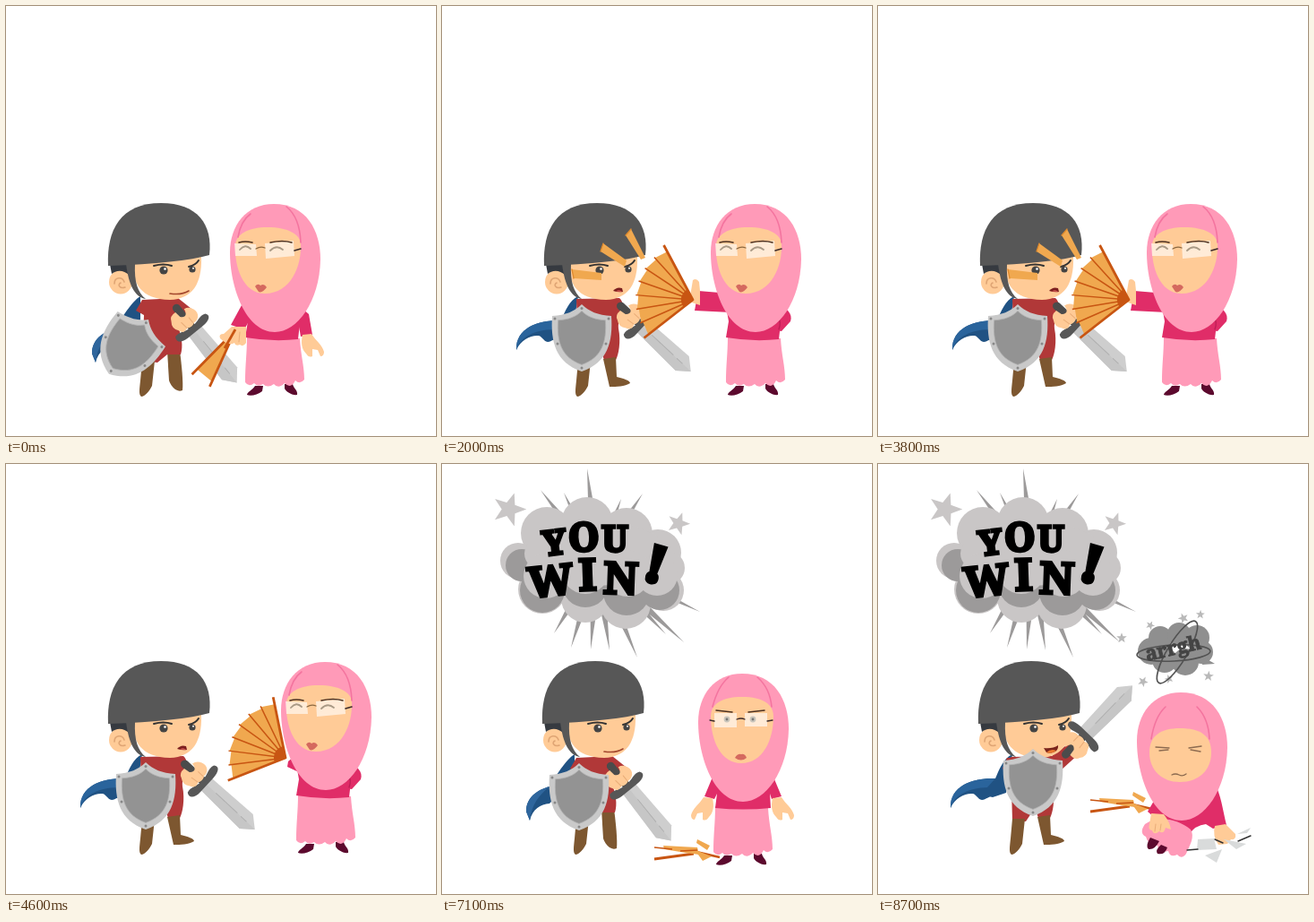
Recreate the animation shown at these times as an HTML page. Size 480 by 480 pixels, loop 8.9 s.

```html
<!DOCTYPE html>
<html lang="en">
<head>
<meta charset="utf-8">
<title>Duel</title>
<style>
html, body { margin: 0; width: 100%; height: 100%; overflow: hidden; background: #fff; }
svg { display: block; width: 100%; height: 100%; }
.skin { fill: #ffcb97; }
.grey { fill: #575757; }
.pink { fill: #ff9ab8; }
.rose { fill: #e02d68; }
.boot { fill: #7d5730; }
.red { fill: #b13838; }
.shoe { fill: #5c0a2e; }
.gold { fill: #f0a84f; }
.line { fill: none; stroke-linecap: round; stroke-linejoin: round; }
.fold { stroke: #f4749f; stroke-width: 1.6; }
.brow { stroke: #4a3020; stroke-width: 1.5; }
.eye { stroke: #a99a86; stroke-width: 1.8; }
.stick { stroke: #c85512; stroke-width: 2.8; stroke-linecap: butt; }
.finger { stroke: #e9ac78; stroke-width: 1; }
text { font-family: "Noto Serif", "Liberation Serif", serif; font-weight: 900; text-anchor: middle; }
#title text { fill: #000; stroke: #000; stroke-width: 3.4; }
</style>
</head>
<body>
<svg viewBox="0 0 480 480">
<defs>
  <path id="star" d="M0-10 2.6-3.2 10-3 4.2 1.6 6.2 9 0 4.6-6.2 9-4.2 1.6-10-3-2.6-3.2Z"/>
  <path id="plate" d="M156 333C148 341 138 345 123 346C121 375 127 398 156 408C185 398 191 375 189 346C174 345 164 341 156 333Z"/>
  <path id="hand" class="skin" d="M331 367L341 366C346 374 353 378 355 386Q355 391 351 391L348 384L342 383L342 391Q338 393 335 388C330 383 329 376 331 367Z"/>
  <path id="veil" d="M299 221C335 221 351 250 351 283C350 330 325 364 300 364C268 364 250 315 250 275C250 245 268 221 299 221Z"/>
  <path id="skirt" d="M269 369L328 371C329 390 333 402 333 417Q328 423 323 418Q318 428 311 421Q304 428 299 422Q292 427 287 422Q281 426 277 421Q271 426 267 420C267 400 269 388 269 369Z"/>
  <g id="shoes" class="shoe">
    <path d="M278 424L287 424L286 430C281 434 273 436 269 434C269 431 275 429 278 424Z"/>
    <path d="M311 422L320 422C321 427 326 429 325 434C319 435 312 430 311 427Z"/>
  </g>
</defs>

<g id="title">
  <path id="spikes" fill="#9c9a9a"/>
  <g fill="#c9c6c6">
    <use href="#star" transform="translate(75 50) rotate(18) scale(1.85)"/>
    <use href="#star" transform="translate(264 66) rotate(20) scale(1.25)"/>
    <circle cx="85" cy="108" r="20"/><circle cx="117" cy="77" r="29"/>
    <circle cx="162" cy="66" r="29"/><circle cx="206" cy="78" r="29"/>
    <circle cx="241" cy="99" r="26"/><circle cx="253" cy="116" r="18"/>
    <circle cx="112" cy="140" r="27"/><circle cx="160" cy="150" r="27"/>
    <circle cx="205" cy="156" r="28"/><circle cx="247" cy="141" r="23"/>
  </g>
  <g fill="#9c9a9a">
    <circle cx="89" cy="113" r="18"/><circle cx="112" cy="141" r="25"/>
    <circle cx="160" cy="134" r="26"/><circle cx="206" cy="143" r="26"/>
    <circle cx="243" cy="141" r="22"/>
  </g>
  <g fill="#c9c6c6">
    <ellipse cx="172" cy="100" rx="80" ry="36"/>
    <circle cx="116" cy="125" r="25"/><circle cx="160" cy="118" r="27"/>
    <circle cx="207" cy="122" r="26"/><circle cx="240" cy="124" r="23"/>
  </g>
  <text font-size="38" transform="translate(127 101) rotate(-7)">Y</text>
  <text font-size="44" transform="translate(159 97) rotate(-3)">O</text>
  <text font-size="39" transform="translate(193 98)">U</text>
  <text font-size="47" transform="translate(123 147) rotate(-6)">W</text>
  <text font-size="49" transform="translate(163 141) rotate(-2)">I</text>
  <text font-size="49" transform="translate(199 145) rotate(2)">N</text>
  <text font-size="55" style="stroke-width:6" transform="translate(233 131) rotate(16)">!</text>
</g>

<g id="knight">
  <g data-on="ready proud">
    <path fill="#205283" d="M150 324C140 330 128 350 122 360C108 364 96 372 96 388L100 398C103 385 112 380 122 379L150 350Z"/>
    <path fill="#2f669d" d="M122 360C108 364 96 372 96 388L100 398C102 380 110 370 122 360Z"/>
    <path class="boot" d="M180 385L194 385C196 400 198 420 197 429C190 432 184 424 182 418Z"/>
    <path class="red" d="M152 328L192 326L212 342L192 358C196 368 198 380 195 389L180 389L169 398L152 396L154 345L145 340Z"/>
  </g>
  <g data-on="guard thrust raise cheer">
    <path fill="#205283" d="M152 324C142 328 137 342 133 351C110 350 82 358 83 384C88 372 100 367 108 368C112 369 113 374 118 375C124 374 126 370 130 372L145 367Z"/>
    <path fill="#2a649c" d="M133 351C110 350 82 358 83 384C88 368 104 362 124 361Z"/>
    <path class="red" d="M150 327L198 326C207 334 196 345 197 360C200 375 197 390 194 395L181 395L177 384L167 399L152 398Z"/>
    <path class="boot" d="M180 394L194 392L195 414C203 416 210 418 210 421C204 425 195 425 187 425Z"/>
  </g>
  <path data-on="cheer" class="red" d="M146 328L196 326L219 309L228 322L206 342L170 360L141 340Z"/>
  <path class="boot" d="M152 396L166 396L163 424C160 430 155 436 151 436C148 434 149 428 150 418Z"/>

  <ellipse class="skin" cx="128" cy="308" rx="13" ry="13.5"/>
  <path class="line" stroke="#dfa574" stroke-width="1.6" d="M121 310C121 302 130 302 132 308M133 314C127 316 124 311 128 309"/>
  <path class="skin" d="M141 287C142 310 150 327 183 328C208 327 219 310 218 280Z"/>
  <path fill="#363a40" d="M116 288L137 288L138 301C130 293 122 296 118 299Z"/>
  <path class="grey" d="M134 288L144 288C143 308 147 320 156 327C144 325 137 312 134 288Z"/>
  <path class="grey" d="M114 290C112 250 128 220 173 220C214 220 231 244 227 278Q195 287 114 290Z"/>
  <g fill="#444"><circle cx="176" cy="295" r="4.6"/><circle cx="208" cy="294" r="3.6"/></g>
  <g fill="#fff"><circle cx="177.5" cy="293.5" r="1.3"/><circle cx="209" cy="292.7" r="1"/></g>
  <path class="line" stroke="#333" stroke-width="2" d="M165 290Q176 287 185 290M204 291Q212 289 215 284"/>
  <path data-on="ready proud" class="line" stroke="#a2462c" stroke-width="1.6" d="M183 321Q196 323 204 318"/>
  <g data-on="guard">
    <path fill="#7c1f1f" d="M191 318Q195 313 201 315L202 319Q197 320 191 318Z"/>
    <path fill="#d65a55" d="M194 318.5Q198 316 201 319Z"/>
  </g>
  <g data-on="thrust raise">
    <path fill="#5e1c1c" d="M188 321C191 313 200 312 205 315C206 320 202 322 188 321Z"/>
    <path fill="#d65a55" d="M191 321Q196 315 201 320Z"/>
  </g>
  <g data-on="cheer">
    <path fill="#7a241c" d="M187 317Q197 318 203 314C204 321 196 324 190 322Z"/>
    <path fill="#e8772f" d="M190 322Q195 317 201 320Q196 324 190 322Z"/>
  </g>
  <g id="hits" class="gold">
    <path d="M180 265L206 284L204 291L177 274Z"/>
    <path d="M211 249L227 281L222 283L205 256Z"/>
    <path d="M145 294L178 298L178 306L147 304Z"/>
    <path class="line" stroke="#e08a2c" stroke-width="1.3" d="M180 265L177 274M211 249L205 256M145 294L147 304"/>
  </g>
  <g id="sword">
    <path fill="#cecece" d="M4-9L66-11L79 0L66 11L4 9Z"/>
    <path fill="#c6c6c6" d="M4 0L70 0L79 0L66 11L4 9Z"/>
    <path class="line" stroke="#b0b0b0" d="M20 0H52M58 0H66"/>
    <path class="line" stroke="#4b4b4b" stroke-width="9" d="M-28 0L0 0"/>
    <path class="grey" d="M-3-21C2-25 6-20 6-10L6 11C6 21 1 25-4 21C-6 14-1 10-1 0C-1-10-6-14-3-21Z"/>
    <path class="skin" d="M-15-14C-7-17-2-10-3-5Q0 0-3 5Q0 12-7 14Q-14 19-20 14Q-26 12-25 4L-18 3C-13-1-15-5-22-6Q-21-12-15-14Z"/>
    <path class="line finger" d="M-4-4L-11-4M-4 5L-12 6"/>
  </g>
  <g id="shield">
    <use href="#plate" fill="#c9c9c9"/>
    <use href="#plate" fill="#939393" stroke="#b2b2b2" transform="translate(156 370) scale(.8) translate(-156 -370)"/>
    <g fill="#888"><circle cx="156" cy="337.5" r="1.5"/><circle cx="126" cy="349" r="1.5"/><circle cx="186" cy="349" r="1.5"/><circle cx="129" cy="377" r="1.5"/><circle cx="183" cy="377" r="1.5"/><circle cx="156" cy="404" r="1.5"/></g>
  </g>
</g>

<g id="shards" class="gold">
  <path class="line stick" d="M237 441L281 435M284 433L310 439"/>
  <path d="M247 426L285 428L287 436L272 434L248 430Z"/>
  <path d="M278 429L301 438L291 443L283 432Z"/>
  <path d="M285 419L299 426L296 431L284 423Z"/>
  <path class="line stick" style="stroke-width:1.5" d="M237 428L257 430M266 432L285 431"/>
</g>

<g id="lady">
  <g data-on="rest low fan back">
    <path data-on="low fan back" class="rose" d="M322 332C335 336 342 344 339 352L329 363L322 362L328 348Z"/>
    <g data-on="rest">
      <path class="rose" d="M322 330L338 344L342 367L329 369Z"/>
      <use href="#hand"/>
    </g>
    <use href="#shoes"/>
    <use href="#skirt" class="pink"/>
    <path class="rose" d="M267 335L330 337L326 372Q297 375 267 370L270 352Z"/>
    <path data-on="low fan back" class="line" stroke="#bd1d55" stroke-width="1.3" d="M325 349Q329 352 326 361"/>
    <g data-on="rest">
      <path class="rose" d="M263 334L251 356L266 361L275 345Z"/>
      <g class="fan shut" transform="translate(256 362) rotate(124.5)"></g>
      <path class="skin" d="M252 358L268 358L268 376Q265 381 261 378Q256 380 255 376Q248 380 239 371Q237 366 243 366Z"/>
      <path class="line finger" d="M261 364L260 375M254 365L251 372"/>
      <path class="line stick" d="M256 361L244 382"/>
    </g>
    <g data-on="low">
      <path class="rose" d="M266 333L249 347L262 357L275 345Z"/>
      <path class="skin" d="M252 348L262 357L255 369Q248 373 244 369Q238 370 239 363Q232 358 231 351Q236 346 244 348Z"/>
      <path class="line finger" d="M248 360L244 367M255 360L252 365"/>
      <g class="fan shut" transform="translate(251 353) rotate(147)"></g>
    </g>
    <g data-on="fan">
      <path class="rose" d="M272 321L236 318L232 340L272 342Z"/>
      <path class="skin" d="M238 334L226 330L230 306Q234 303 237 308L238 318Z"/>
      <g class="fan wide" transform="translate(230 328) rotate(192)"></g>
    </g>
    <g data-on="back">
      <path class="rose" d="M258 332L266 325L272 345L257 338Z"/>
      <g class="fan wide" transform="translate(255 328) rotate(208.5)"></g>
    </g>
    <use href="#veil" class="pink"/>
    <path class="skin" d="M256 268C256 255 270 247 292 247C315 247 329 255 329 266C330 290 318 321 289 321C264 321 255 290 256 268Z"/>
    <path class="line fold" d="M259 258Q262 240 273 232M313 224Q328 236 329 264"/>
    <path fill="#fff" fill-opacity=".62" d="M255 265L279 266L280 279L256 279ZM289 265L321 262L322 279L290 282Z"/>
    <path class="line" stroke="#8b6840" stroke-width="1.3" d="M279 271Q284 268 289 270"/>
    <path class="line" stroke="#3a2a2a" stroke-width="1.6" d="M322 273L329 271"/>
    <path class="line eye" d="M261 272Q267 265 273 271M295 273Q302 266 309 272"/>
    <path class="line brow" d="M260 264Q267 262 275 264M295 264Q309 261 319 264"/>
    <path fill="#d5695f" d="M278 313Q281 309 284 312Q288 309 291 314Q286 321 282 319Z"/>
  </g>

  <g data-on="shock">
    <use href="#shoes" transform="translate(37 13)"/>
    <use href="#skirt" class="pink" transform="translate(36 13)"/>
    <path class="rose" d="M303 347L318 352L354 352L369 347L379 371L368 374L366 368L367 384Q336 387 305 384L307 368L304 374L293 371Z"/>
    <use href="#hand" transform="translate(38 6)"/>
    <use href="#hand" transform="translate(633 6) scale(-1 1)"/>
    <use href="#veil" class="pink" transform="translate(36 13)"/>
    <path class="skin" d="M300 282C300 268 312 260 335 260C358 260 370 268 370 282C370 308 358 334 334 334C311 334 300 308 300 282Z"/>
    <path class="line fold" d="M302 271Q308 248 320 238M352 238Q366 250 368 271"/>
    <path fill="#fff" fill-opacity=".62" d="M304 278H329V294H304ZM338 278H363V293H338Z"/>
    <path class="line" stroke="#3a2a2a" stroke-width="1.3" d="M299 286L304 287M329 285Q334 283 338 285M363 287L369 286"/>
    <g fill="#c9c5bb"><circle cx="318" cy="285" r="3.4"/><circle cx="347" cy="285" r="3.4"/></g>
    <g fill="#777"><circle cx="318" cy="285" r="1.4"/><circle cx="347" cy="285" r="1.4"/></g>
    <path class="line brow" d="M306 275L324 277M342 277L360 275"/>
    <path fill="#d5695f" d="M327 328Q330 323 334 324Q338 323 340 328Q334 333 327 328Z"/>
  </g>

  <g data-on="fallen">
    <path class="rose" d="M308 360L375 355C383 368 385 388 389 403L374 407L366 402Q354 403 347 414L310 400Z"/>
    <path class="skin" d="M376 404L388 402L399 413Q400 420 394 419L390 424L380 425Q373 415 376 404Z"/>
    <path class="pink" d="M298 402C312 392 334 396 349 408C354 416 348 426 344 435Q339 442 334 436Q326 440 324 432Q314 435 312 426Q301 425 299 416Q291 412 298 402Z"/>
    <path class="shoe" d="M304 417L314 421Q309 431 302 430Q298 427 304 417ZM316 425L323 428Q320 437 312 435Q309 431 316 425Z"/>
    <path class="rose" d="M308 376L301 388L308 394L322 390Z"/>
    <use href="#veil" class="pink" transform="translate(39 34)"/>
    <path class="skin" d="M303 322C303 303 316 295 337 295C360 295 372 303 372 322C372 342 358 355 337 355C317 355 303 342 303 322Z"/>
    <path class="line fold" d="M305 307Q309 282 321 271M356 271Q369 284 370 307"/>
    <path class="line" stroke="#8d6b50" stroke-width="1.3" d="M310 316L325 317M314 320L324 319M347 317L361 315M349 319L360 321M328 347Q332 345 336 347T344 346"/>
    <path class="skin" d="M305 390L319 391Q326 400 327 408L321 406Q319 414 314 410Q308 415 306 409Q301 409 303 402Z"/>
    <path class="line finger" d="M310 402L309 410M316 402L315 409"/>
  </g>
</g>

<g id="lens">
  <path fill="#d9dbdb" d="M357 419L375 418L378 430L356 431ZM386 419L411 424L400 430ZM365 437L384 430L378 445ZM401 413L416 406L412 412Z"/>
  <path class="line" stroke="#333" stroke-width="1.4" d="M345 431L357 430M376 419L385 423M402 421L416 415"/>
</g>

<g id="groan">
  <g fill="#b9b9b9" id="sparks"></g>
  <g fill="#8f8f8f">
    <circle cx="305" cy="209" r="15"/><circle cx="315" cy="194" r="13"/><circle cx="336" cy="190" r="13"/>
    <circle cx="356" cy="194" r="14"/><circle cx="361" cy="210" r="13"/><circle cx="343" cy="221" r="15"/>
    <circle cx="320" cy="219" r="14"/><path d="M359 213L376 223L362 224Z"/>
  </g>
  <g class="line" stroke="#525252" stroke-width="1.7">
    <ellipse cx="330" cy="211" rx="41" ry="9" transform="rotate(-3 330 211)"/>
    <ellipse cx="334" cy="210" rx="40" ry="11" transform="rotate(-59 334 210)"/>
  </g>
  <text fill="#444" stroke="#444" stroke-width=".9" font-size="22" transform="translate(331 213) rotate(-13)">arrgh</text>
</g>
</svg>
<script>
const LOOP = 8900;
const $ = id => document.getElementById(id);
const polar = (r, deg) => [r * Math.cos(deg * Math.PI / 180), r * Math.sin(deg * Math.PI / 180)].map(v => v.toFixed(1)).join(' ');

// A folding fan around its pivot, opened evenly about the x axis
function drawFan(el, span, panels) {
  const step = span / panels;
  let leaf = 'M0 0', ribs = '';
  for (let i = 0; i < panels; i++) {
    const a = -span / 2 + i * step;
    leaf += `L${polar(63, a)}L${polar(61, a + step)}`;
    if (i) ribs += `M0 0L${polar(64, a)}`;
  }
  const edge = `M${polar(69, -span / 2)}L0 0L${polar(69, span / 2)}`;
  const hub = `M0 0L${polar(13, -span / 2)}A13 13 0 0 1 ${polar(13, span / 2)}Z`;
  el.innerHTML = `<path class="gold" d="${leaf}Z"/><path class="line stick" style="stroke-width:1.5" d="${ribs}"/>` +
    `<path class="line stick" d="${edge}"/><path fill="#c85512" d="${hub}"/>`;
}
document.querySelectorAll('.wide').forEach(el => drawFan(el, 100, 7));
document.querySelectorAll('.shut').forEach(el => drawFan(el, 20, 1));

const tips = [[162, 5], [110, 29], [136, 32], [200, 39], [224, 33], [288, 165], [270, 199], [250, 190],
  [218, 216], [187, 208], [166, 207], [144, 205], [125, 189]];
$('spikes').setAttribute('d', tips.map(([x, y]) => {
  const dx = x - 173, dy = y - 110, k = 8 / Math.hypot(dx, dy);
  return `M${173 - dy * k} ${110 + dx * k}L${x} ${y}L${173 + dy * k} ${110 - dx * k}Z`;
}).join(''));

$('sparks').innerHTML = [[272, 194], [304, 180], [341, 172], [360, 168], [296, 243], [325, 240], [369, 237]]
  .map(([x, y], i) => `<use href="#star" transform="translate(${x} ${y}) rotate(${i * 25}) scale(${i % 2 ? .5 : .58})"/>`).join('');

const moves = {
  ready: ['translate(208 359) rotate(51)', 'translate(159 350) rotate(36) translate(-156 -333)'],
  proud: ['translate(208 359) rotate(51)', 'translate(-1 1)'],
  guard: ['translate(220 354) rotate(43)', ''],
  thrust: ['translate(230 332)', 'translate(5 -15)'],
  raise: ['translate(226 332) rotate(-20)', 'translate(5 -15)'],
  cheer: ['translate(231 304) rotate(-46)', 'translate(19 -15)']
};

// start, knight, lady, lady's shift
const beats = [
  [0, 'ready', 'rest', 0], [200, 'ready', 'rest', 12], [400, 'guard', 'low', 24], [600, 'thrust', 'low', 32],
  [800, 'thrust', 'low', 45], [1000, 'guard', 'fan', 53], [1200, 'guard', 'fan', 50],
  [1400, 'guard', 'back', 54], [1600, 'guard', 'back', 57], [1800, 'guard', 'fan', 50],
  [2200, 'guard', 'fan', 47], [2400, 'guard', 'fan', 50], [2500, 'raise', 'fan', 50],
  [3400, 'guard', 'fan', 50], [3600, 'raise', 'fan', 50], [3800, 'guard', 'fan', 50],
  [4000, 'guard', 'fan', 53], [4200, 'guard', 'back', 53], [4400, 'guard', 'back', 55], [4600, 'guard', 'back', 57],
  [4800, 'guard', 'back', 50], [5000, 'guard', 'low', 44], [5200, 'guard', 'low', 38], [5400, 'guard', 'low', 35],
  [5600, 'guard', 'low', 32], [5900, 'thrust', 'low', 32], [6100, 'thrust', 'low', 40],
  [6300, 'thrust', 'shock', 4], [6500, 'guard', 'shock', 2], [6700, 'guard', 'shock', 0],
  [6900, 'ready', 'shock', 0], [7100, 'proud', 'shock', 0], [7700, 'proud', 'fallen', 0], [8300, 'cheer', 'fallen', 0]
];

const toggle = (el, on) => { el.style.display = on ? '' : 'none'; };
const pose = (id, name) => $(id).querySelectorAll('[data-on]').forEach(el => toggle(el, el.dataset.on.split(' ').includes(name)));
const shift = (id, x, y = 0) => $(id).setAttribute('transform', `translate(${x} ${y})`);

function draw(t) {
  const [, knight, lady, dx] = beats.findLast(b => b[0] <= t);
  const jolt = t >= 2700 && t < 3300 && Math.floor(t / 100) % 2 ? 3 : 0;
  pose('knight', knight);
  pose('lady', lady);
  shift('knight', t >= 7100 ? -2 : jolt);
  shift('lady', dx + jolt);
  $('sword').setAttribute('transform', moves[knight][0]);
  $('shield').setAttribute('transform', moves[knight][1]);
  const drop = [-60, -25, 14][Math.floor((t - 6300) / 200)] || 0;
  shift('shards', 0, lady === 'fallen' ? -53 : drop);
  toggle($('shards'), t >= 6300);
  toggle($('hits'), t >= 1800 && t < 4000);
  toggle($('title'), t >= 7100);
  toggle($('groan'), t >= 7700);
  toggle($('lens'), t >= 8300);
}

const start = performance.now();
function tick() {
  draw((performance.now() - start) % LOOP);
  requestAnimationFrame(tick);
}
tick();
</script>
</body>
</html>
```
